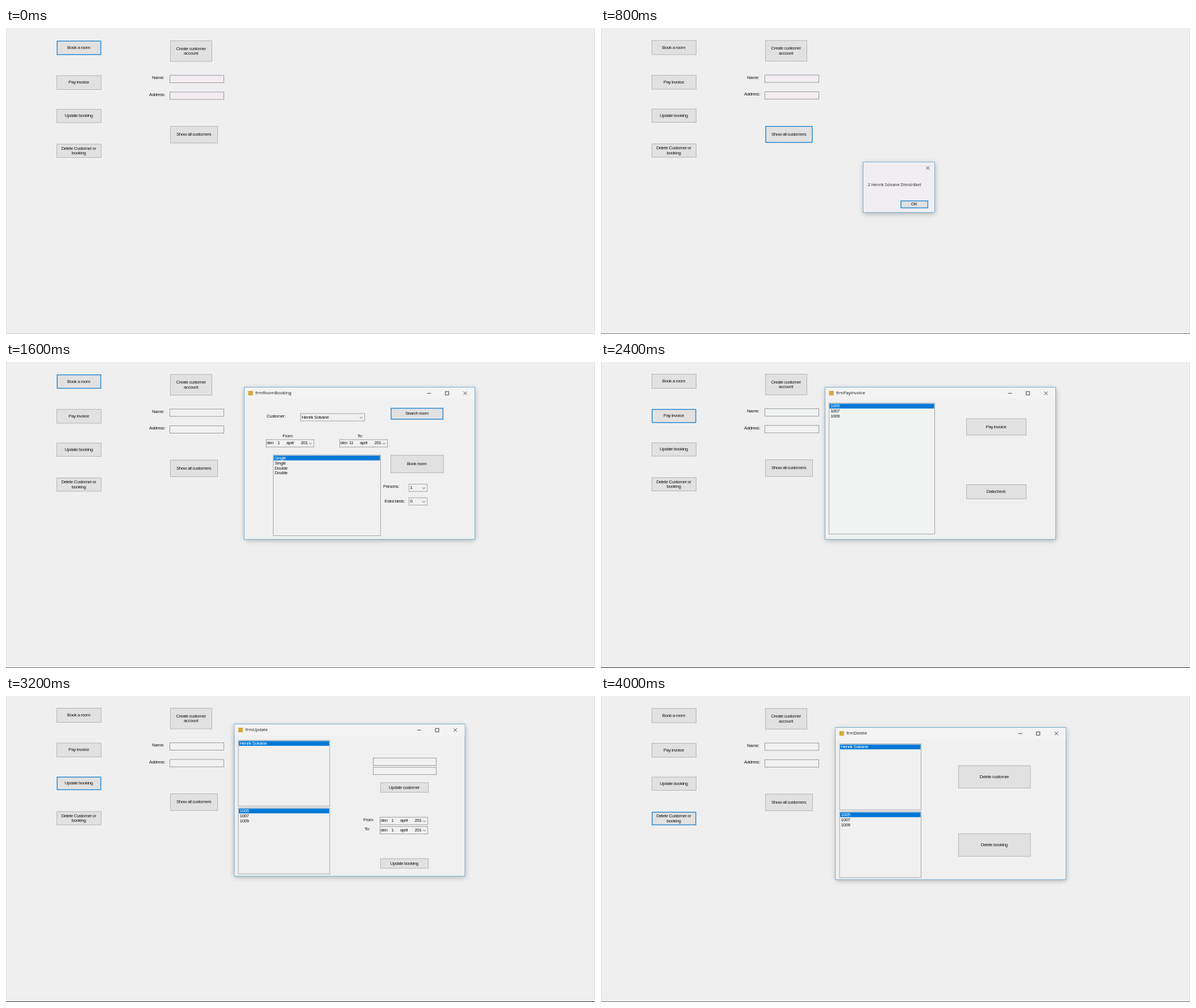
These frames come from a looping animation (1037 px wide and 540 px high, 4.8 s). An HTML page with a canvas:

```html
<!DOCTYPE html>
<html lang="en">
<head>
<meta charset="utf-8">
<title>Room booking</title>
<style>
  html, body { margin: 0; width: 100%; height: 100%; overflow: hidden; background: #efefef; }
  canvas { display: block; }
</style>
</head>
<body>
<canvas id="stage" width="1037" height="540"></canvas>
<script>
const ctx = document.getElementById('stage').getContext('2d');
const STEP = 800;
const BLUE = '#0078d7', INK = '#161616', FACE = '#efefef';
const UI = { font: '8px "Liberation Sans", Arial, sans-serif', gap: '-0.46px' };
const CAPTION = { font: '7.8px "Open Sans", "Noto Sans", sans-serif', gap: '-0.05px' };
const MESSAGE = { font: '6.8px "Open Sans", "Noto Sans", sans-serif', gap: '0.15px' };
const GUEST = 'Henrik Solvane';
const INVOICES = ['1005', '1007', '1009'];

function text(str, x, y, align = 'left', color = INK, style = UI) {
  ctx.font = style.font;
  ctx.letterSpacing = style.gap;
  ctx.textAlign = align;
  ctx.textBaseline = 'middle';
  ctx.fillStyle = color;
  ctx.fillText(str, x, y);
}

function box(x, y, w, h, fill, stroke, line = 1, inset = 0) {
  ctx.fillStyle = fill;
  ctx.fillRect(x, y, w, h);
  ctx.strokeStyle = stroke;
  ctx.lineWidth = line;
  ctx.strokeRect(x + inset, y + inset, w - 2 * inset, h - 2 * inset);
}

function path(points, color = '#333', width = 0.9) {
  ctx.beginPath();
  points.forEach(([x, y], i) => i % 2 ? ctx.lineTo(x, y) : ctx.moveTo(x, y));
  ctx.strokeStyle = color;
  ctx.lineWidth = width;
  ctx.stroke();
}

function button(x, y, w, h, label, focus = false) {
  if (focus) box(x, y, w, h, '#e1e1e1', '#1f86d2', 1.4, 0.6);
  else box(x, y, w, h, '#e1e1e1', '#b4b4b4');
  const lines = label.split('\n');
  const top = y + h / 2 - (lines.length - 1) * 4.4;
  lines.forEach((s, i) => text(s, x + w / 2 - 0.5, top + i * 8.8, 'center'));
}

function input(x, y, w, h, fill = '#f1f1f1') {
  box(x, y, w, h, fill, '#9c979e');
}

function chevron(x, y) {
  path([[x - 2.5, y - 1.2], [x, y + 1.3], [x, y + 1.3], [x + 2.5, y - 1.2]], '#555');
}

function combo(x, y, w, h, value) {
  box(x, y, w, h, '#f0f0f0', '#a6a6a6');
  text(value, x + 2, y + h / 2);
  chevron(x + w - 6, y + h / 2 + 0.5);
}

function datePicker(x, y, day) {
  box(x, y, 84, 13, '#f1f1f1', '#9c9c9c');
  const mid = y + 6.2;
  text('den', x + 1, mid);
  text(day, x + 24, mid, 'right');
  text('april', x + 35.5, mid);
  text('201', x + 61, mid);
  chevron(x + 78, mid + 0.7);
}

function list(x, y, w, h, rows, fill = '#f0f0f0') {
  box(x, y, w, h, fill, '#a2a6aa');
  ctx.fillStyle = BLUE;
  ctx.fillRect(x + 1, y + 1.2, w - 2, 8.4);
  rows.forEach((s, i) => text(s, x + 2.5, y + 5.6 + i * 8.85, 'left', i ? INK : '#fff'));
}

function cross(x, y) {
  path([[x - 3, y - 3], [x + 3, y + 3], [x + 3, y - 3], [x - 3, y + 3]]);
}

function panel(x, y, w, h, fill) {
  ctx.save();
  ctx.shadowColor = 'rgba(0,0,0,0.3)';
  ctx.shadowBlur = 9;
  ctx.shadowOffsetY = 2;
  ctx.fillStyle = fill;
  ctx.fillRect(x, y, w, h);
  ctx.restore();
  box(x, y, w, h, fill, '#79aed1');
}

function form(x, y, title) {
  const w = 406, h = 268.5, mid = y + 10.7, right = x + w;
  panel(x, y, w, h, '#f0f0f0');
  ctx.fillStyle = '#f3f3f3';
  ctx.fillRect(x + 0.5, y + 0.5, w - 1, 20.5);
  ctx.fillStyle = '#d6a83c';
  ctx.fillRect(x + 7, y + 6.5, 8, 8);
  text(title, x + 19.5, mid, 'left', INK, CAPTION);
  path([[right - 84, mid], [right - 77, mid]]);
  ctx.strokeRect(right - 52, mid - 3, 6, 6);
  cross(right - 17, mid);
}

function mainForm({ dy, focus, field, edge }) {
  ctx.fillStyle = FACE;
  ctx.fillRect(0, 0, 1037, 540);
  ctx.fillStyle = '#dcdcdc';
  ctx.fillRect(0, 0, 1, 540);
  ctx.fillRect(1036, 0, 1, 540);
  ctx.fillStyle = edge;
  ctx.fillRect(0, 539, 1037, 1);

  ctx.save();
  ctx.translate(0, dy);
  [
    [89.5, 21.5, 78, 25, 'Book a room'],
    [89.5, 83, 78, 24.5, 'Pay invoice'],
    [89.5, 142.5, 78, 23.5, 'Update booking'],
    [89.5, 204, 78, 23.5, 'Delete Customer or\nbooking'],
    [289.5, 21.5, 73, 36.5, 'Create customer\naccount'],
    [289.5, 172.5, 83, 29.5, 'Show all customers']
  ].forEach((b, i) => button(...b, i === focus));
  text('Name:', 257, 87);
  text('Address:', 252, 116.7);
  input(288.5, 82.5, 95, 13, field);
  input(288.5, 112, 95, 13, field);
  ctx.restore();
}

function customerBox() {
  panel(461.5, 236.5, 126, 89, '#f1eef1');
  cross(575.5, 247);
  text('2 ' + GUEST + ' Dimstråket', 470, 277.5, 'left', INK, MESSAGE);
  button(527.5, 304.5, 48.5, 13.5, 'OK', true);
}

function bookingForm() {
  form(419.5, 44.5, 'frmRoomBooking');
  text('Customer:', 459, 95.5);
  combo(518.5, 91, 113, 13, GUEST);
  button(677.5, 81, 92.5, 20.5, 'Search room', true);
  text('From:', 487, 130.3);
  text('To:', 618.5, 130.3);
  datePicker(458, 137, '1');
  datePicker(587.5, 137, '11');
  list(470.5, 164, 189, 142.5, ['Single', 'Single', 'Double', 'Double']);
  button(677.5, 164.5, 92.5, 31, 'Book room');
  text('Persons:', 664, 219.5);
  combo(709.5, 215.5, 32, 13, '1');
  text('Extra beds:', 666.5, 245.5);
  combo(709.5, 239.5, 32, 13, '0');
}

function invoiceForm() {
  form(394.5, 44.5, 'frmPayInvoice');
  list(401.5, 72.5, 186, 231, INVOICES, '#f1f3f2');
  button(643.5, 100, 105, 29, 'Pay invoice');
  button(643.5, 216.5, 105, 25, 'Datecheck');
}

function updateForm() {
  form(402, 49.5, 'frmUpdate');
  list(409, 78.3, 161, 116, [GUEST]);
  list(409, 197.5, 161, 116.5, INVOICES);
  input(646.5, 109.5, 111, 13);
  input(646.5, 125.7, 111, 13);
  button(659.5, 153, 84, 17, 'Update customer');
  text('From:', 629, 218.3);
  text('To:', 631, 234.7);
  datePicker(658.5, 214, '1');
  datePicker(658.5, 230.3, '1');
  button(659.5, 287, 84, 17, 'Update booking');
}

function deleteForm() {
  form(412.7, 55.5, 'frmDelete');
  list(420, 84.5, 143.5, 116.5, [GUEST]);
  list(420, 204.2, 143.5, 116.3, INVOICES);
  button(629.5, 123, 126.5, 39.5, 'Delete customer');
  button(629.5, 243, 126.5, 40, 'Delete booking');
}

const scenes = [
  { dy: 1, focus: 0, field: '#f1edf1', edge: '#cfcfcf' },
  { dy: 0.5, focus: 5, field: '#f1edf1', edge: '#707070', popup: customerBox },
  { dy: 0.5, focus: 0, field: '#f1f1f1', edge: '#707070', popup: bookingForm },
  { dy: 0, focus: 1, field: '#f1f3f2', edge: '#2a2a2a', popup: invoiceForm },
  { dy: 0, focus: 2, field: '#f1f1f1', edge: '#2a2a2a', popup: updateForm },
  { dy: 0.5, focus: 3, field: '#f1f1f1', edge: '#707070', popup: deleteForm }
];

function draw(now) {
  const scene = scenes[Math.floor(now / STEP) % scenes.length];
  mainForm(scene);
  if (scene.popup) scene.popup();
}

const start = performance.now();
function tick() {
  draw(performance.now() - start);
  requestAnimationFrame(tick);
}
tick();
</script>
</body>
</html>
```
